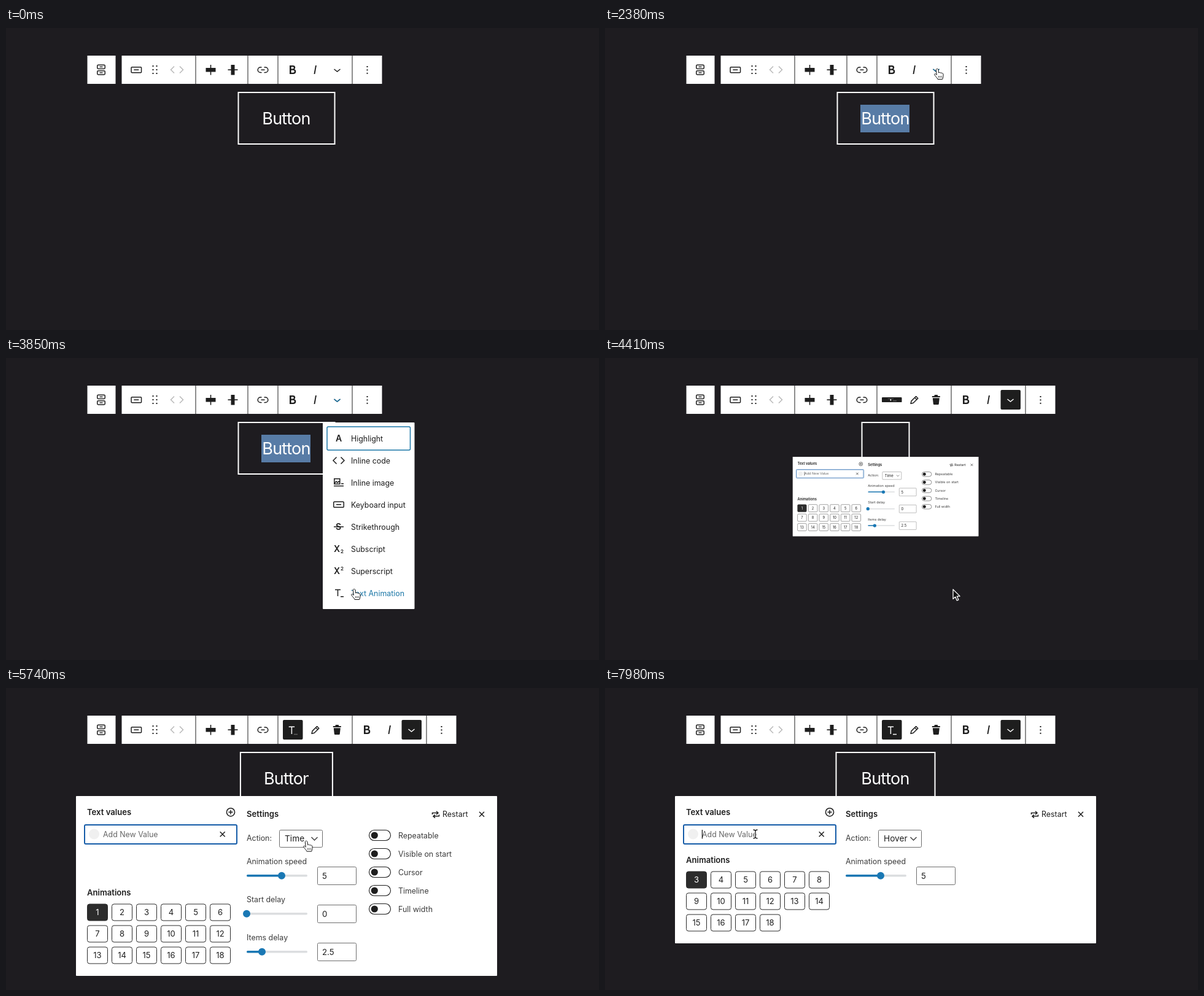
These frames come from a looping animation (966x492 px, 8 s). An HTML page:

```html
<!DOCTYPE html>
<html lang="en">
<head>
<meta charset="utf-8">
<title>Button text animation</title>
<style>
html, body { margin: 0; width: 100%; height: 100%; overflow: hidden; background: #1e1c20; }
body { position: relative; font: 12.4px Inter, "Open Sans", sans-serif; }
svg { position: absolute; left: 0; top: 0; }
text { fill: #1e1e1e; white-space: pre; }
.head { font-size: 13.1px; font-weight: 600; }
.label { fill: #3c3c3c; }
.mid { text-anchor: middle; }
.line { fill: none; stroke: #1e1e1e; stroke-width: 1.5; }
.white { stroke: #fff; }
.blue { stroke: #1a76a6; }
.field { fill: #fff; stroke: #6e6e6e; }

.btn { position: absolute; left: 456.5px; top: 104px; height: 82px; padding: 0 37.5px;
  border: 2px solid #fff; transform: translateX(-50%); color: #fff;
  font-size: 27px; letter-spacing: -.03em; line-height: 83px; }
.btn span { display: block; width: 80px; overflow: hidden; white-space: nowrap; text-align: center;
  animation: reveal 8s linear infinite; }
.sel { position: absolute; left: 416px; top: 125px; width: 80px; height: 45px; background: #587ca6; }
@keyframes reveal {
  0%, 54.99% { width: 80px; }
  55%, 63.97% { width: 0; }
  72.7%, 84.7% { width: 82px; }
  84.8%, 100% { width: 84px; }
}

#bar { animation: bar 8s step-end infinite; }
@keyframes bar { 0% { width: 424px; } 55% { width: 545px; } }
#right { animation: shift 8s step-end infinite; }
@keyframes shift { 0% { transform: none; } 55% { transform: translateX(121px); } }
#type { transform-origin: 467px 68px; animation: grow 8s linear infinite; }
@keyframes grow { 0%, 55.6% { transform: scaleY(.25); } 56.8%, 100% { transform: none; } }
.blink { animation: blink 1s linear infinite; }
@keyframes blink { 0%, 62% { opacity: 1; } 63%, 77% { opacity: .3; } 97%, 100% { opacity: 1; } }

#menu { transform-origin: 516px 105px; animation: unfold 8s linear infinite; }
@keyframes unfold {
  0%, 30.8% { transform: translateY(-14px) scale(0); }
  31.5% { transform: translateY(-2px) scale(.87); }
  33.7%, 100% { transform: none; }
}
#focus { animation: focus 8s step-end infinite; }
@keyframes focus { 0% { transform: none; } 49.8% { transform: translateY(252px); } }
.item text { fill: inherit; }
.item { fill: #1e1e1e; animation: pass 8s calc(var(--i) * 81.6ms) step-end infinite backwards; }
.item:last-child { animation: rest 8s step-end infinite; }
@keyframes pass { 0% { fill: #1e1e1e; } 38% { fill: #1a76a6; } 39.02% { fill: #1e1e1e; } }
@keyframes rest { 0% { fill: #1e1e1e; } 45.15% { fill: #1a76a6; } }

#panel { transform-origin: 457px 176px; animation: pop 8s linear infinite; }
@keyframes pop {
  0%, 55.6% { transform: translateY(-15px) scale(.4417); }
  57.6%, 100% { transform: none; }
}

#cursor { animation: move 8s ease-in-out infinite; }
@keyframes move {
  0%, 3.5% { transform: translate(465px, 430px); }
  4.375%, 6% { transform: translate(462px, 231px); }
  8.75% { transform: translate(454px, 175px); }
  10.6% { transform: translate(439px, 142px); }
  12.2% { transform: translate(446px, 133px); }
  14%, 21.5% { transform: translate(457px, 156px); }
  27% { transform: translate(530px, 48px); }
  29%, 35% { transform: translate(541px, 67px); animation-timing-function: ease-in; }
  37.625% { transform: translate(548px, 100px); animation-timing-function: linear; }
  45.5% { transform: translate(552px, 378px); }
  48.1%, 59.8% { transform: translate(567px, 377px); animation-timing-function: ease-in; }
  65.625% { transform: translate(510px, 285px); animation-timing-function: ease-out; }
  70% { transform: translate(489px, 252px); }
  72.6%, 75.5% { transform: translate(489px, 249px); }
  80%, 84.8% { transform: translate(490px, 263px); }
  93.6%, 100% { transform: translate(245px, 238px); }
}
</style>
</head>
<body>
<div class="sel" data-on="1390-4400"></div>
<div class="btn"><span>Button</span></div>
<svg id="stage" width="966" height="492" viewBox="0 0 966 492"></svg>
<script>
const LOOP = 8000;
const list = (n, fn) => Array.from({ length: n }, (_, i) => fn(i)).join('');
const text = (x, y, s, cls = '', more = '') => `<text x="${x}" y="${y}" class="${cls}" ${more}>${s}</text>`;
const line = (d, cls = '', more = '') => `<path class="line ${cls}" d="${d}" ${more}/>`;
const box = (x, y, w, h, fill, r = 0) => `<rect x="${x}" y="${y}" width="${w}" height="${h}" rx="${r}" fill="${fill}"/>`;
const frame = (x, y, w, h, cls, r = 2, more = '') => `<rect class="${cls}" x="${x}" y="${y}" width="${w}" height="${h}" rx="${r}" ${more}/>`;
const on = (when, body) => `<g data-on="${when}">${body}</g>`;
const at = (x, y, body) => `<g transform="translate(${x} ${y})">${body}</g>`;
const cross = (x, y) => line(`M${x - 4} ${y - 4}l8 8m0-8l-8 8`);
const chevron = (x, y, cls) => line(`M${x - 5} ${y - 2}l5 4 5-4`, cls);
const divider = x => box(x - .5, 45, 1, 46, '#1e1e1e');
const dark = x => box(x, 52, 32.5, 32, '#1e1e1e', 2);
const keyIcon = (x, y, color = '#1e1e1e') => at(x, y,
  `<rect x="-8.25" y="-4.75" width="16.5" height="9" rx="1.2" fill="none" stroke="${color}" stroke-width="1.5"/>` +
  box(-4, -1, 8, 1.5, color));

const bold = 'M14.7 11.3c1-.6 1.5-1.6 1.5-3 0-2.3-1.3-3.4-4-3.4H7v14h5.8c1.4 0 2.5-.3 3.3-1 .8-.7 1.2-1.7 1.2-2.9.1-1.9-.8-3.1-2.6-3.7zm-5.1-4h2.3c.6 0 1.1.1 1.4.4.3.3.5.7.5 1.2s-.2 1-.5 1.2c-.3.3-.8.4-1.4.4H9.6V7.3zm4.6 9c-.4.3-1 .4-1.7.4H9.6v-3.9h2.9c.7 0 1.3.2 1.7.5.4.3.6.8.6 1.4s-.2 1.2-.6 1.6z';

function toolbar() {
  const left = box(132.5, 45, 46, 46, '#fff') +
    `<rect id="bar" x="188.5" y="45" width="424" height="46" fill="#fff"/>` +
    at(143, 56, [4.25, 13.75].map(y =>
      frame(5.75, y, 12.5, 6.2, 'line', 1.4) + box(9.5, y + 2.4, 5, 1.4, '#1e1e1e')).join('')) +
    keyIcon(212.3, 68.4) +
    list(6, i => box(238.5 + i % 2 * 6, 61 + (i >> 1) * 6, 2, 2, '#1e1e1e')) +
    line('M274 62.5l-5.5 5.5 5.5 5.5M283 62.5l5.5 5.5-5.5 5.5', '', 'style="stroke:#b9b9b9"') +
    box(325.5, 65, 16, 6.5, '#1e1e1e') + box(332.7, 60, 1.6, 16.5, '#1e1e1e') +
    box(366.5, 60, 6, 16.5, '#1e1e1e') + box(361.5, 67.3, 16, 1.6, '#1e1e1e') +
    line('M416.5 63.9h-2a4.3 4.3 0 0 0 0 8.6h2M420.5 63.9h2a4.3 4.3 0 0 1 0 8.6h-2M415.5 68.2h6') +
    divider(309) + divider(394);

  const tools = divider(443) +
    `<g id="type">${dark(451)}${line('M460.7 63.3h9.4M465.4 63.3v11.7', 'white')}` +
    `<path class="line white blink" d="M469 75.5h6"/></g>` +
    line('M498 74.3l1-4.2 7.6-7.6 3.2 3.2-7.6 7.6zM504.6 64.5l3.2 3.2', '', 'stroke-linejoin="round"') +
    box(532.8, 62, 13, 2, '#1e1e1e') + box(536.5, 60, 5.6, 3, '#1e1e1e', 1) +
    '<path d="M533.8 65.2h11l-1 9.6q-.1 1.2-1.3 1.2h-6.4q-1.2 0-1.3-1.2z" fill="#1e1e1e"/>';

  const right = divider(443) + divider(564) +
    at(455, 56, `<path d="${bold}" fill="#1e1e1e"/>`) +
    at(491.5, 56, '<path d="M12.5 5L10 19h1.9l2.5-14z" fill="#1e1e1e"/>') +
    chevron(539.5, 69) +
    on('2200-4400', chevron(539.5, 69, 'blue')) +
    on('4400-8000', dark(523.5) + chevron(539.5, 69, 'white')) +
    list(3, i => box(587.5, 62 + i * 5.4, 2, 2, '#1e1e1e'));

  return left + on('4400-8000', tools) + `<g id="right">${right}</g>`;
}

function menu() {
  const glyph = (s, x = -5) => `<text x="${x}" y="5" font-size="14" font-weight="600">${s}</text>`;
  const small = (s, y) => `<text x="3" y="${y}" font-size="8" font-weight="600">${s}</text>`;
  const stroke = d => `<path d="${d}" fill="none" stroke="#1e1e1e" stroke-width="1.5"/>`;
  const rows = [
    ['Highlight', glyph('A')],
    ['Inline code', stroke('M-3.5-5.5L-9 0l5.5 5.5M3.5-5.5L9 0 3.5 5.5')],
    ['Inline image', stroke('M-7.2-6.2h9v8.4h-9zM-7 1l3-3 2 2 2-2 2 2M4 1.8h4M-8 5.6h16')],
    ['Keyboard input', keyIcon(0, 0)],
    ['Strikethrough', glyph('S') + stroke('M-8 0H8')],
    ['Subscript', glyph('X', -8) + small(2, 7)],
    ['Superscript', glyph('X', -8) + small(2, -1)],
    ['Text Animation', stroke('M-6-5.5h9M-1.5-5.5V5M3 5.7h5')]
  ];
  return on('2440-4400', `<g id="menu">${box(516, 105, 149.5, 304, '#fff', 1)}` +
    frame(523, 112, 135.5, 38, 'line blue', 2, 'id="focus"') + '<g>' +
    rows.map(([name, icon], i) => `<g class="item" style="--i:${i}">` +
      at(542, 131 + i * 36, icon + text(20, 4.8, name)) + '</g>').join('') + '</g></g>');
}

function grid(first, y) {
  return text(132, y - 14.5, 'Animations', 'head') + list(19 - first, i => {
    const x = 132.5 + i % 6 * 40, top = y + Math.floor(i / 6) * 35;
    return `<rect x="${x}" y="${top}" width="33" height="27" rx="3.5" fill="${i ? '#fff' : '#2c2c2c'}" stroke="#2c2c2c"/>` +
      text(x + 16.5, top + 18.3, first + i, 'mid', `font-size="13"${i ? '' : ' style="fill:#fff"'}`);
  });
}

function slider(y, name, value, knob) {
  return text(392, y + 4.5, name, 'label') +
    box(392, y + 22, 99, 3.5, '#dcdee0', 1.7) + box(392, y + 22, knob - 392, 3.5, '#1a78b4', 1.7) +
    `<circle cx="${knob}" cy="${y + 23.7}" r="6" fill="#1a78b4"/>` +
    frame(507.5, y + 9.5, 63, 29, 'field') + text(515, y + 28.8, value, '', 'font-size="13.2"');
}

function dropdown() {
  const white = 'style="fill:#fff" font-size="13.8"';
  const blue = y => box(434, y, 83, 20, '#4f94f8');
  return on('5940-6780',
    '<rect x="434" y="234" width="83" height="48" rx="6" fill="#000" opacity=".15"/>' +
    box(434, 233, 83, 46, '#7d7d7f', 6) +
    on('5940-6260', blue(236)) + on('6260-6780', blue(256)) +
    line('M440.5 246.5l3 3.5 5-8', 'white') +
    text(456, 251, 'Time', '', white) + text(456, 270.3, 'Hover', '', white));
}

function panel() {
  const blueFrame = 'style="fill:none;stroke:#155ca8;stroke-width:2"';
  const toggles = ['Repeatable', 'Visible on start', 'Cursor', 'Timeline', 'Full width'].map((name, i) =>
    frame(591.5, 231.5 + i * 30, 35, 17, 'line', 8.5, 'style="stroke-width:1.1"') +
    `<circle cx="600.3" cy="${240 + i * 30}" r="5.6" fill="#1e1e1e"/>` +
    text(639, 244.5 + i * 30, name, 'label')).join('');
  const select = (name) => frame(445.5, 231.5, 70, 28, 'field') + text(454, 250.3, name, '', 'font-size="13.7"') +
    line('M497.5 243l5 5 5-5', '', 'style="stroke:#444"');

  const timed = box(114, 176, 686, 293, '#fff', 1) + grid(1, 352) + select('Time') +
    slider(344, 'Start delay', 0, 392) + slider(406, 'Items delay', 2.5, 417) + toggles;
  const hover = box(114, 176, 686, 240, '#fff', 1) + grid(3, 299) + select('Hover');

  return on('4400-8000', '<g id="panel">' +
    on('4400-6780', timed) + on('6780-8000', hover) +
    text(132, 206.5, 'Text values', 'head') +
    '<circle class="line" cx="366" cy="202.3" r="6.6"/>' + line('M362.5 202.3h7M366 198.8v7') +
    '<circle cx="143.5" cy="238" r="8.5" fill="#f0f0f0"/>' +
    text(158, 242.6, 'Add New Value', '', 'style="fill:#666"') + cross(352.7, 238.3) +
    on('4400-5940 7490-8000', frame(128, 223, 248, 31, '', 2, blueFrame)) +
    on('4400-4900 7490-8000', box(157.8, 231, 1.2, 14.5, '#111')) +
    text(392, 210.3, 'Settings', 'head') +
    line('M694.5 206v-2.5h9M701 200.8l3 2.7-3 2.7M705.5 206.3v2.5h-9M699 206.2l-3 2.7 3 2.7') +
    text(711, 210.3, 'Restart') + cross(775, 205.7) +
    text(392, 248.8, 'Action:', 'label') +
    slider(282, 'Animation speed', 5, 449) +
    on('5180-5330', '<path d="M551.5 303.5l4-4.5 4 4.5zM551.5 308l4 4.5 4-4.5z" fill="#555"/>') +
    on('5940-7490', frame(445, 231, 71.5, 29, '', 2, blueFrame)) +
    dropdown() + '</g>');
}

function cursor() {
  const hand = '<path d="M-1.7 1C-1.6-1.1 1.7-1.1 1.9 1l.7 5c.9-1 2.4-.8 2.7.3.9-.8 2.3-.5 2.6.7.9-.6 2.1 0 2.1 1.4v3.1c0 2-1 3-1.3 5H1C.5 14.5-2.5 12-4.2 9.3-5 7.8-3 7-1.8 8.4l1.1 1z" fill="#fff" stroke="#111" stroke-width="1"/>' +
    line('M2.6 11v3M4.9 11v3M7.2 11v3', '', 'style="stroke-width:.8"');
  const arrow = '<path d="M0 0v15.5l3.6-3.4 2.6 6 2.7-1.2-2.6-5.8h4.9z" fill="#111" stroke="#fff" stroke-width="1.3" stroke-linejoin="round"/>';
  const beam = 'M-3.5-7q3 0 3.5 2 .5-2 3.5-2M-3.5 7q3 0 3.5-2 .5 2 3.5 2M0-5V5';
  return '<g id="cursor">' +
    on('280-620 1860-2100 4400-5180 5330-5480 6780-7280', arrow) +
    on('620-1860 2100-4400 5480-6780', hand) +
    on('5180-5330 7280-8000', line(beam, 'white', 'style="stroke-width:2.6"') + line(beam, '', 'style="stroke-width:1.3"')) +
    '</g>';
}

stage.innerHTML = toolbar() + menu() + panel() + cursor();

// Turn each data-on time window (ms) into stepped opacity keyframes.
let css = '';
document.querySelectorAll('[data-on]').forEach((el, i) => {
  const spans = el.dataset.on.split(' ').map(s => s.split('-').map(n => n / LOOP * 100));
  const keys = spans.map(([a, b]) => `${a}%{opacity:1}` + (b < 100 ? `${b}%{opacity:0}` : '')).join('');
  const last = spans[spans.length - 1][1] < 100 ? 0 : 1;
  css += `@keyframes on${i}{0%{opacity:0}${keys}100%{opacity:${last}}}`;
  el.style.animation = `on${i} ${LOOP}ms step-end infinite`;
});
document.head.appendChild(document.createElement('style')).textContent = css;
</script>
</body>
</html>
```
